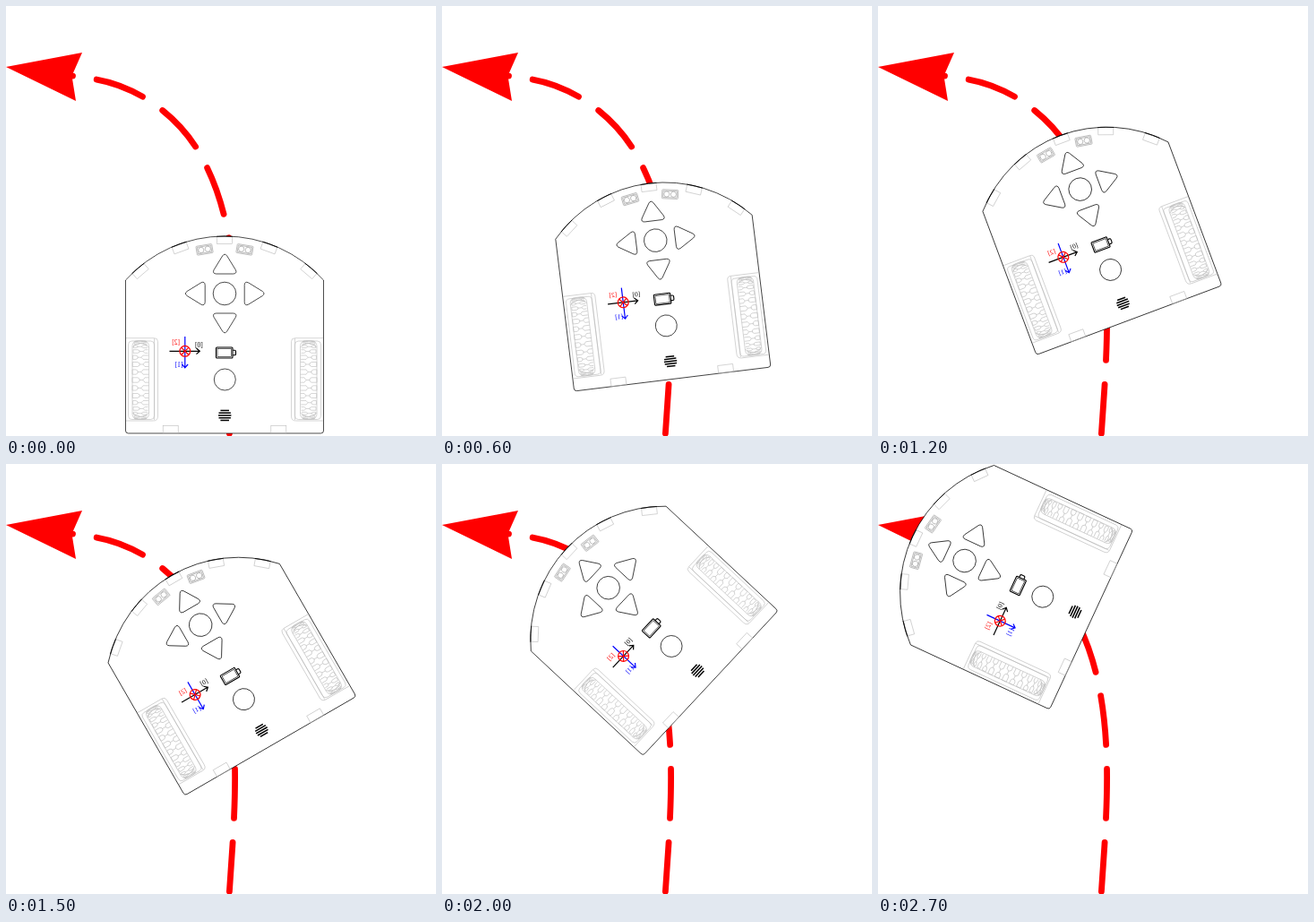
An HTML page for the animation above (2800 ms loop, 480 px wide and 480 px high).

```html
<!DOCTYPE html>
<html lang="en">
<head>
<meta charset="utf-8">
<title>Robot driving along a curve</title>
<style>
  html, body { margin: 0; width: 100%; height: 100%; overflow: hidden; background: #fff; }
  svg { display: block; width: 100vw; height: 100vh; }
  text { font: 7.5px "Liberation Serif", serif; text-anchor: middle; }
</style>
</head>
<body>
<svg viewBox="0 0 480 480" fill="none">
  <path d="M249.4 477.2C252.3 435 255.6 392 255.6 350C255.6 293 249.3 231.5 224.5 180.4C202.3 130.7 153.6 91.3 101 82C92 80.3 83 79 74 78"
        pathLength="492.5" stroke="red" stroke-width="6.8" stroke-linecap="round" stroke-dasharray="55 27"/>
  <path d="M0 68L85 52L73.5 78L78 106Z" fill="red"/>
  <g id="robot" stroke="#000" stroke-width=".7">
    <path d="M133.5 306A149 149 0 0 1 354.5 306V474q0 3-3 3H136.5q-3 0-3-3Z" fill="#fff"/>
    <g id="grey" stroke="#bbb" stroke-width=".6"></g>
    <g id="keys"></g>
    <circle cx="244" cy="321" r="12.8"/>
    <circle cx="244.3" cy="417" r="12"/>
    <g stroke-width="1.1">
      <rect x="234.5" y="381" width="18.5" height="12" rx="1"/>
      <rect x="236" y="382.5" width="15.5" height="9" stroke-width=".6"/>
      <path d="M253 384.2h2.2q1.3 0 1.3 1.3v3q0 1.3-1.3 1.3h-2.2"/>
    </g>
    <path id="speaker" stroke-width="1.5"/>
    <g stroke-width="1.2">
      <path d="M182.5 385.3H216M212.5 382l3.8 3.3-3.8 3.3"/>
      <path d="M199.8 369V403.5M196.5 400l3.3 3.8 3.3-3.8" stroke="#00f"/>
      <path d="M195.6 381.1l8.4 8.4M204 381.1l-8.4 8.4" stroke="red"/>
      <circle cx="199.8" cy="385.3" r="5.9" stroke="red"/>
    </g>
    <g id="labels" stroke="none"></g>
  </g>
</svg>
<script>
const $ = id => document.getElementById(id);
const range = (n, f) => Array.from({ length: n }, (_, i) => f(i)).join('');
const turn = (a, shape) => `<g transform="rotate(${a} 244 406)">${shape}</g>`;

// Edge sensors sit on the front arc, the line sensors just behind it.
const edge = a => turn(a, '<rect x="235.5" y="257.3" width="17" height="8.2"/>' +
  '<path d="M235 257.3A149 149 0 0 1 253 257.3" stroke="#000" stroke-width=".9"/>');
const eyes = a => turn(a, `<g stroke="#999"><rect x="235" y="265" width="18" height="10" rx="1"/>
  <rect x="236.3" y="266.3" width="15.4" height="7.4"/>
  <circle cx="240.2" cy="270" r="3.1"/><circle cx="247.8" cy="270" r="3.1"/></g>`);

// Tread rows bunch up towards both ends of the wheel: blocks joined by a thin neck.
function tread(i) {
  const a = (i - 7) * 12 * Math.PI / 180, c = Math.cos(a);
  const y = 417.5 + 43 * Math.sin(a), h = 2.7 * c, inset = 3 * (1 - c);
  const l = 141 + inset, r = 159.5 - inset, s = i % 2 ? 1 : -1;
  return `M${l} ${y - h}H${146 + s}L${148 + s} ${y - h / 2}V${y + h / 2}L${146 + s} ${y + h}H${l}Z` +
    `M${148 + s} ${y}H${152 + s}M${r} ${y - h}H${154 + s}L${152 + s} ${y}L${154 + s} ${y + h}H${r}`;
}
const wheel = `<path d="M134 370.7H165.5q4 0 4 4V458q0 5-5 5H134M165.5 371V462"/>
  <rect x="136.5" y="374" width="29" height="87.5" rx="4"/>
  <rect x="141" y="373.5" width="18.5" height="88" rx="6"/>
  <path d="M141 381q9.2-9 18.5 0M141 454q9.2 9 18.5 0"/>
  <path d="${range(15, tread)}"/>
  <rect x="175.2" y="468.3" width="17" height="8.6"/>`;

$('grey').innerHTML = [-40.5, -20, 0, 20, 40.5].map(edge).join('') +
  eyes(-9.5) + eyes(9.5) + wheel +
  `<g transform="translate(488) scale(-1 1)">${wheel}</g>`;

$('keys').innerHTML = range(4, i =>
  `<path transform="rotate(${i * 90} 244.2 321)"
    d="M241.7 278.9q2.5-3.4 5 0L256.4 294.7q1.8 4-2.7 4.3H234.7q-4.5-.3-2.7-4.3Z"/>`);

$('speaker').setAttribute('d', range(5, i => {
  const dy = 2.7 * i - 5.4, w = Math.sqrt(52 - dy * dy);
  return `M${244.2 - w} ${457 + dy}h${2 * w}`;
}));

const label = (s, x, y, color) =>
  `<text transform="translate(${x} ${y}) scale(-1 1)" fill="${color}">${s}</text>`;
$('labels').innerHTML = label('[0]', 215.3, 380.6, '#000') +
  label('[1]', 193.2, 403, '#00f') + label('[2]', 189.5, 378, 'red');

// time in steps, centre x, centre y, heading
const poses = [
  [0, 244, 367, 0],
  [6, 243.9, 307.3, 7],
  [10, 243, 267.6, 15],
  [12, 241.8, 247.7, 20.5],
  [15, 240.2, 219.5, 30],
  [18, 233.5, 187, 40.5],
  [20, 219.3, 169.6, 47],
  [24, 176.2, 137.8, 60.2],
  [27, 138.3, 127.4, 65.1]
];

function slope(i, k) {
  const rate = j => (poses[j + 1][k] - poses[j][k]) / (poses[j + 1][0] - poses[j][0]);
  const last = poses.length - 1;
  if (i === 0) return rate(0);
  if (i === last) return rate(last - 1);
  const before = poses[i][0] - poses[i - 1][0], after = poses[i + 1][0] - poses[i][0];
  return (rate(i - 1) * after + rate(i) * before) / (before + after);
}

// Smooth curve through the poses.
function pose(t, k) {
  let i = 0;
  while (i < poses.length - 2 && t >= poses[i + 1][0]) i++;
  const p = poses[i], q = poses[i + 1], d = q[0] - p[0];
  const u = (t - p[0]) / d, v = 1 - u;
  return p[k] * v * v * (1 + 2 * u) + q[k] * u * u * (1 + 2 * v) +
    d * u * v * (slope(i, k) * v - slope(i + 1, k) * u);
}

function draw(ms) {
  const t = Math.floor(ms / 100) % 28;
  $('robot').setAttribute('transform',
    `translate(${pose(t, 1)} ${pose(t, 2)}) rotate(${-pose(t, 3)}) translate(-244 -367)`);
}

const start = performance.now();
function tick() {
  draw(performance.now() - start);
  requestAnimationFrame(tick);
}
tick();
</script>
</body>
</html>
```
